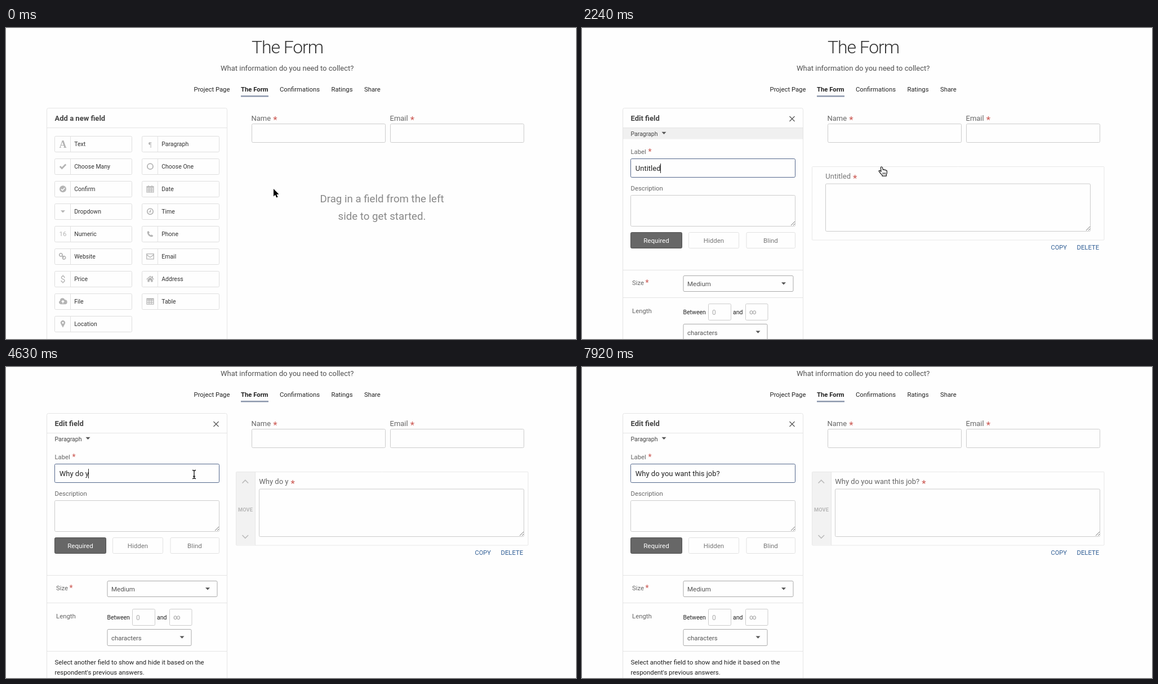
Recreate the animation shown at these times as an HTML page with a canvas. Size 1012x553 px, loop 8.02 s.

```html
<!DOCTYPE html>
<html lang="en">
<head>
<meta charset="utf-8">
<title>Form builder</title>
<style>
  html, body { margin: 0; width: 100%; height: 100%; overflow: hidden; background: #fefefe; }
  canvas { display: block; }
</style>
</head>
<body>
<canvas id="stage" width="1012" height="553"></canvas>
<script>
const ctx = document.getElementById('stage').getContext('2d');
const LOOP = 8020, PAGE = '#fefefe', LINE = '#e4e4e4', ICON = '#b4b4b4', RED = '#cb5751';

// Each track lists [start time, ...values]; a value holds until the next start.
const CURSOR = [
  [0, 'arrow', 475, 286], [450, 'arrow', 441, 265], [600, 'arrow', 393, 234],
  [740, 'hand', 361, 214], [890, 'hand', 351, 208], [1640, 'hand', 402, 214],
  [1790, 'hand', 468, 230], [1940, 'hand', 518, 244], [2090, 'hand', 532, 247],
  [2840, 'hand', 498, 234], [2990, 'arrow', 400, 207], [3140, 'ibeam', 356, 194],
  [3290, 'ibeam', 338, 191], [3430, 'ibeam', 334, 191], [6880, 'ibeam', 334, 177],
  [7020, 'none', 0, 0]
];
const GHOST = [
  [0, null], [1640, 252, 192.5], [1790, 350, 213.5], [1940, 407, 228.5],
  [2090, 422, 231.5], [2240, null]
];
const QUESTION = 'Why do you want this job?';
const TYPED = [
  [4030, 2], [4330, 3], [4480, 6], [4630, 8], [4780, 9], [4930, 10], [5080, 12],
  [5230, 14], [5380, 17], [5530, 19], [5680, 20], [5830, 22], [5980, 24], [6430, 25]
];
const CARET = [[0, true], [2840, false], [3290, true], [3730, false], [4030, true],
  [6880, false], [7320, true], [7920, false]];

const at = (track, t) => track.findLast(key => key[0] <= t).slice(1);

function text(s, x, y, size, color, { weight = 400, align = 'left', spacing = 0, family = 'Roboto, sans-serif' } = {}) {
  ctx.font = `${weight} ${size}px ${family}`;
  ctx.letterSpacing = spacing + 'px';
  ctx.textAlign = align;
  ctx.fillStyle = color;
  ctx.fillText(s, x, y);
  return x + ctx.measureText(s).width;
}

function box(x, y, w, h, stroke, { fill, radius = 2 } = {}) {
  ctx.beginPath();
  ctx.roundRect(x, y, w, h, radius);
  if (fill) { ctx.fillStyle = fill; ctx.fill(); }
  ctx.lineWidth = 1;
  ctx.strokeStyle = stroke;
  ctx.stroke();
}

function fillPath(d, color) {
  ctx.fillStyle = color;
  ctx.fill(new Path2D(d));
}

function strokePath(d, color, width = 1) {
  ctx.strokeStyle = color;
  ctx.lineWidth = width;
  ctx.stroke(new Path2D(d));
}

function placed(x, y, draw) {
  ctx.save();
  ctx.translate(x, y);
  draw();
  ctx.restore();
}

const star = (x, y, size = 17, color = RED) => text('*', x, y, size, color);
const down = (x, y) => fillPath(`M${x} ${y}h8l-4 4.3z`, '#555');
const grip = (x, y) => strokePath(`M${x - 8} ${y - 1}l7-7M${x - 4} ${y - 1}l3-3`, '#777');

// Icons are centred on 0,0: [glyph, size, family], or { line width, path, cut-out }.
const RING = r => `M${-r} 0a${r} ${r} 0 1 1 ${2 * r} 0a${r} ${r} 0 1 1 ${-2 * r} 0`;
const SERIF = 'Liberation Serif, serif', SANS = 'Roboto, sans-serif';
const FIELDS = [
  ['Text', ['A', 18, SERIF, 700]],
  ['Paragraph', ['¶', 13, SERIF, 400]],
  ['Choose Many', { line: 2.8, d: 'M-5.2-.2L-1.7 3.3L5.2-3.6' }],
  ['Choose One', { line: 1.8, d: RING(5) }],
  ['Confirm', { d: RING(6), cut: 'M-3.2 0L-.8 2.4L3.4-2' }],
  ['Date', { line: 1.1, d: 'M-6-4.5H6V6H-6zM-6-2H6M-6 .7H6M-6 3.4H6M-2-2V6M2-2V6M-3-6.5V-3M3-6.5V-3M-6-3.4H6' }],
  ['Dropdown', { d: 'M-4-2H4L0 2.3z' }],
  ['Time', { line: 1.7, d: RING(5.2) + 'M.4-3V.8H-2.4' }],
  ['Numeric', ['16', 11.5, SANS, 400]],
  ['Phone', { d: 'M-5.4-3.6L-3.2-5.5L-1-2.4L-2.4-1Q-1 1.4 1.2 2.4L2.6 1L5.4 3.2L3.5 5.4Q-5 4.6-5.4-3.6z' }],
  ['Website', { line: 1.7, d: 'M-5.4-.8a2.7 2.7 0 1 1 4.3-3a2.7 2.7 0 0 1-4.3 3M1-.3a2.7 2.7 0 1 1 0 5a2.7 2.7 0 0 1 0-5M-2.4-1.6L1.6 1.8' }],
  ['Email', { line: 1.3, d: 'M-6.2-4.6H6.2V4.6H-6.2zM-6-3L0 1.6L6-3' }],
  ['Price', ['$', 16, SANS, 400]],
  ['Address', { d: 'M-6.8.2L0-5.6L3-3.2V-5H4.8V-1.6L6.8.2L6 1.2L0-4L-6 1.2zM-4.6 1.2L0-2.7L4.6 1.2V5.4H1.2V2.2H-1.2V5.4H-4.6z' }],
  ['File', { d: 'M-4 5a3.4 3.4 0 0 1-1-6.5A4.3 4.3 0 0 1 3.4-3A3.9 3.9 0 0 1 4 5z', cut: 'M0 3.4V-1M-2.2 .8L0-1.4L2.2 .8' }],
  ['Table', { line: 1.2, d: 'M-6-5H6V5H-6zM-6-3.9H6M-6-1.5H6M-6 1.7H6M-2-4V5M2-4V5' }],
  ['Location', { d: 'M0 6.5L-3.4 .2A4.1 4.1 0 1 1 3.4 .2zM1.6-2A1.6 1.6 0 1 0-1.6-2A1.6 1.6 0 1 0 1.6-2z' }]
];

function icon(shape, x, y) {
  placed(x, y, () => {
    if (Array.isArray(shape)) {
      const [glyph, size, family, weight] = shape;
      text(glyph, 0, size * .35, size, ICON, { align: 'center', family, weight });
    } else if (shape.line) {
      strokePath(shape.d, ICON, shape.line);
    } else {
      fillPath(shape.d, ICON);
      if (shape.cut) strokePath(shape.cut, PAGE, 1.6);
    }
  });
}

function fieldButton([label, shape], x, y, fade = 1) {
  box(x, y, 137, 28, '#dedede', { fill: PAGE });
  strokePath(`M${x + 28} ${y}v28`, '#e2e2e2');
  ctx.save();
  ctx.globalAlpha *= fade;
  icon(shape, x + 14.5, y + 13.7);
  text(label, x + 34.7, y + 17.4, 10.5, '#333');
  ctx.restore();
}

function header() {
  text('The Form', 436, 45, 32, '#333', { weight: 300, spacing: -1.1 });
  text('What information do you need to collect?', 381, 76, 13, '#505050');
  const tabs = [['Project Page', 333.5], ['The Form', 417], ['Confirmations', 486], ['Ratings', 577.5], ['Share', 636]];
  for (const [label, x] of tabs)
    text(label, x, 113, 11.3, '#222', { weight: label === 'The Form' ? 700 : 400 });
  ctx.fillStyle = '#8d98ad';
  ctx.fillRect(417, 120, 49, 2.5);
}

function panel(title) {
  box(72.5, 142.5, 320, 520, LINE, { radius: 3 });
  strokePath('M73 177.5H392', LINE);
  text(title, 86.5, 165.3, 13, '#444', { weight: 700 });
}

function addPanel(dragging) {
  panel('Add a new field');
  FIELDS.forEach((field, i) => {
    const faded = dragging && field[0] === 'Paragraph';
    fieldButton(field, i % 2 ? 241.5 : 86.5, 192.5 + 40 * (i >> 1), faded ? .25 : 1);
  });
}

function editPanel({ label, selected, caret, scrolled }) {
  panel('Edit field');
  strokePath('M368.5 157l9 9m0-9l-9 9', '#555', 1.2);
  if (!scrolled) {
    ctx.fillStyle = '#f0f0f0';
    ctx.fillRect(73, 178, 319, 19.5);
  }
  text('Paragraph', 86.5, 192, 10.5, '#444');
  down(141.5, 184.7);

  text('Label', 86.5, 224, 11.3, '#666');
  star(117.5, 224.5, 14);
  box(86.5, 232.5, 292, 33, '#53678c');
  if (selected) {
    ctx.fillStyle = '#b4d5fe';
    ctx.fillRect(95, 241, 45, 17);
  }
  const end = text(label, 94.8, 253.7, 13, '#222');
  if (caret) strokePath(`M${Math.floor(end) + .5} 241v17`, '#222');

  text('Description', 86.5, 289, 11.3, '#666');
  box(86.5, 297.5, 292, 55, '#ccc');
  grip(379, 352);

  box(86.5, 363.5, 91, 28, '#505050', { fill: '#676767' });
  box(189.5, 363.5, 89, 28, '#e2e2e2');
  box(292, 363.5, 86.5, 28, '#e2e2e2');
  text('Required', 132, 382, 11.6, '#fff', { align: 'center' });
  text('Hidden', 234, 382, 11.5, '#777', { align: 'center' });
  text('Blind', 335, 382, 11.6, '#777', { align: 'center' });

  strokePath('M73 430.5H392M73 479.5H392M73 565.5H392', LINE);
  text('Size', 89, 456.5, 11.3, '#666');
  star(112.5, 457.5, 14);
  box(180, 440.5, 195, 28, '#aaa');
  text('Medium', 187, 459, 11.5, '#555');
  down(354, 452.3);

  text('Length', 89, 506.8, 11.4, '#666');
  text('Between', 179.5, 508.6, 10.5, '#222');
  box(224.5, 490.5, 40, 29, '#ccc');
  text('0', 231, 509.5, 12, '#aaa');
  text('and', 268, 508.6, 10.6, '#222');
  box(290.5, 490.5, 39.5, 29, '#ccc');
  text('∞', 297, 509, 12, '#999');
  box(180, 526.5, 149, 29, '#aaa');
  text('characters', 187, 545.7, 11.4, '#555');
  down(308.5, 538.5);

  text('Select another field to show and hide it based on the', 86.5, 589, 11.45, '#222');
  text("respondent's previous answers.", 86.5, 606.5, 11.4, '#222');
}

function input(label, x) {
  const end = text(label, x - .5, 164.5, 13, '#666');
  star(end + 4, 169);
  box(x + .5, 170.5, 237, 33, '#ccc');
}

function dropHint(dashed) {
  if (dashed) {
    ctx.setLineDash([3, 3]);
    box(408.5, 246.5, 519, 144.5, '#ccc', { radius: 0 });
    ctx.setLineDash([]);
  }
  text('Drag in a field from the left', 667.5, 310, 18.7, '#888', { align: 'center' });
  text('side to get started.', 667.5, 341, 18.7, '#888', { align: 'center' });
}

// handle: 0 hidden, 0.5 fading in, 1 shown
function question(label, handle) {
  box(408.5, 246.5, 518.5, 130.5, '#e8e8e8', { radius: 1 });
  if (handle) {
    if (handle === 1) {
      ctx.fillStyle = '#f2f2f2';
      ctx.fillRect(409, 247, 33.5, 129.5);
    }
    strokePath('M442.5 247v130', '#e6e6e6');
    strokePath('M419.5 266.5l5.3-5.3 5.3 5.3M419.5 359l5.3 5.3 5.3-5.3', '#bbb', 1.6);
    text('MOVE', 425, 317.3, 9.3, '#b8b8b8', { weight: 700, align: 'center' });
  }
  const x = handle ? 449 : 432;
  const end = text(label, x + .3, 268, 13, handle === 1 ? '#666' : '#777');
  star(end + 4, 273);
  box(x + .5, 277, 470, 84.5, '#ccc');
  grip(x + 471, 361);
  text('COPY', 832.5, 393.5, 11, '#2c5b93');
  text('DELETE', 878.5, 393.5, 11.3, '#2c5b93');
}

const ARROW = 'M0 0V13.4L3 10.6L5.2 15.6L7.6 14.6L5.4 9.7H9.6z';
const HAND = 'M-1.6 1.4Q-1.4-.4 .1 0Q1.3.2 1.6 1.6L2.4 5.2Q4-.2+5.2 5.6Q6.8 4.6 7.4 6.2Q9 5.6 9.4 7.4V10.4Q9.2 12 8.3 13.4V16.2H1V14.6Q-1.8 12.2-4.4 8.4Q-5.4 6.6-4 6.4Q-2.8 6.2-1 8.4z'
  .replace('Q4-.2+5.2 5.6', 'Q4 3.8 5.2 5.6');

function cursor(kind, x, y) {
  placed(x, y, () => {
    ctx.lineJoin = 'round';
    if (kind === 'arrow') {
      strokePath(ARROW, '#fff', 2);
      fillPath(ARROW, '#000');
    } else if (kind === 'hand') {
      fillPath(HAND, '#fff');
      strokePath(HAND, '#111', 1.2);
      strokePath('M2.2 10v3.4M4.3 10v3.4M6.4 10v3.4', '#111', .9);
    } else if (kind === 'ibeam') {
      strokePath('M-3-7.5Q0-7.5 0-5.5Q0-7.5 3-7.5M0-6V6M-3 7.5Q0 7.5 0 5.5Q0 7.5 3 7.5M-2 3.5H2', '#111', 1.3);
    }
  });
}

function render(t) {
  const editing = t >= 2240, scrolled = t >= 2390;
  const dragging = t >= 1640 && !editing;
  const label = t < 4030 ? 'Untitled' : QUESTION.slice(0, at(TYPED, t)[0]);

  ctx.fillStyle = PAGE;
  ctx.fillRect(0, 0, 1012, 553);
  placed(0, scrolled ? -60 : 0, () => {
    header();
    input('Name', 436);
    input('Email', 682);
    if (editing) {
      editPanel({ label, selected: t >= 3730 && t < 4030, caret: at(CARET, t)[0], scrolled });
      question(label, t >= 2540 ? 1 : scrolled ? .5 : 0);
    } else {
      addPanel(dragging);
      dropHint(dragging);
    }
  });

  const [ghostX, ghostY] = at(GHOST, t);
  if (ghostX) {
    ctx.globalAlpha = .75;
    fieldButton(FIELDS[1], ghostX, ghostY);
    ctx.globalAlpha = 1;
  }
  cursor(...at(CURSOR, t));
}

const start = performance.now();
function tick() {
  render((performance.now() - start) % LOOP);
  requestAnimationFrame(tick);
}
tick();
</script>
</body>
</html>
```
